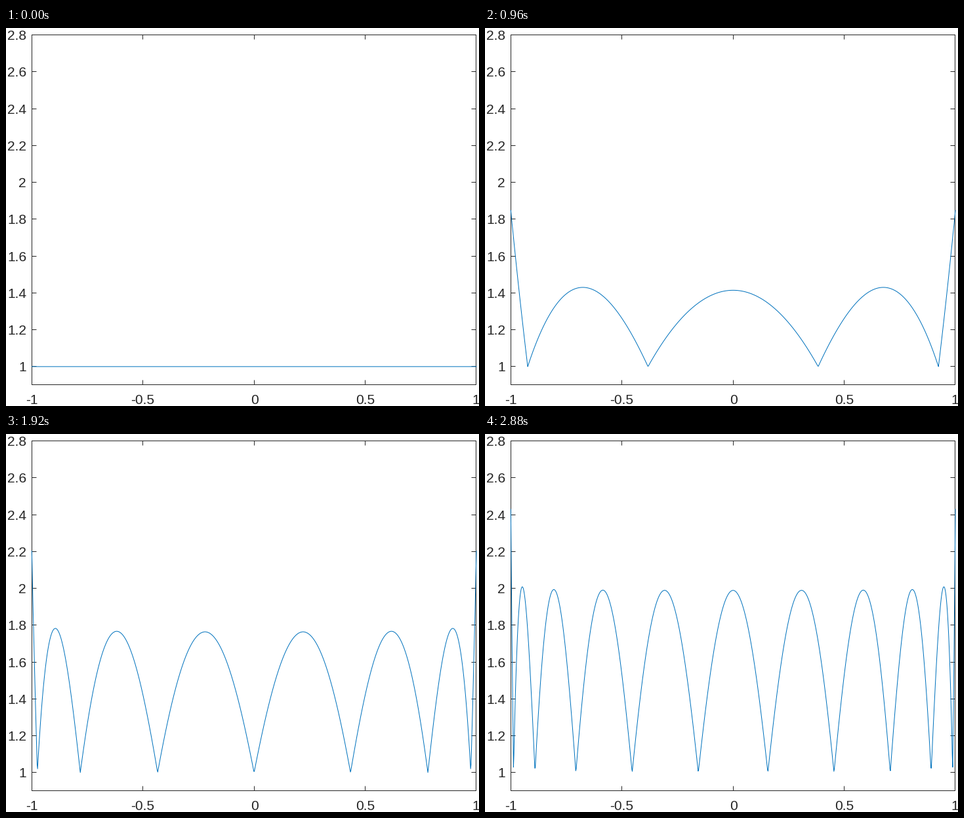
Animation, 721 px wide and 577 px high, one loop 3.2 s. Source, as a matplotlib script:

```python
import numpy as np
import matplotlib.pyplot as plt
from matplotlib.animation import FuncAnimation

# Lebesgue function of Chebyshev nodes, one more node per step.
WIDTH, HEIGHT, DPI = 721, 577, 64
PX = 72 / DPI
LEFT, RIGHT, TOP, BOTTOM = 39.3, 717.0, 10.5, 545.0
X_MIN, X_MAX, Y_MIN, Y_MAX = -1, 1, 0.9, 2.8
TICK = 7
INK, BLUE = "#262626", "#0072BD"
MAX_NODES, STEP_MS = 10, 320

plt.rcParams["font.family"] = "Liberation Sans"
plt.rcParams["path.simplify"] = False

fig = plt.figure(figsize=(WIDTH / DPI, HEIGHT / DPI), dpi=DPI, facecolor="white")
ax = fig.add_axes([0, 0, 1, 1])
ax.set_xlim(0, WIDTH)
ax.set_ylim(HEIGHT, 0)
ax.axis("off")


def to_px(x, y):
    return (LEFT + (x - X_MIN) / (X_MAX - X_MIN) * (RIGHT - LEFT),
            BOTTOM - (y - Y_MIN) / (Y_MAX - Y_MIN) * (BOTTOM - TOP))


def centre(value):
    return np.floor(value + 1e-6) + 0.5


def stroke(x0, y0, x1, y1):
    ax.plot([x0, x1], [y0, y1], color=INK, lw=PX, solid_capstyle="butt", snap=False)


def label(x, y, text, align):
    ax.text(x, y, text, color=INK, fontsize=21 * PX, ha=align, va="baseline")


def draw_frame():
    left, right = 39.5, 716.5
    top, bottom = 10.5, 544.5
    for y in (top, bottom):
        stroke(left - 0.5, y, right + 0.5, y)
    for x in (left, right):
        stroke(x, top, x, bottom)
    for value in np.linspace(-1, 1, 5):
        x = min(centre(to_px(value, 0)[0]), right)
        stroke(x, top, x, top + TICK)
        stroke(x, bottom, x, bottom - TICK)
        label(x, 574, f"{value:g}", "center")
    for value in np.linspace(1, 2.8, 10):
        y = centre(to_px(0, value)[1])
        stroke(left, y, left + TICK, y)
        stroke(right, y, right - TICK, y)
        label(31, y + 7.5, f"{value:.2g}", "right")


def lebesgue(x, count):
    nodes = np.cos((2 * np.arange(count) + 1) * np.pi / (2 * count))
    total = np.zeros_like(x)
    for i, node in enumerate(nodes):
        others = np.delete(nodes, i)
        total += np.abs(np.prod((x[:, None] - others) / (node - others), axis=1))
    return total


draw_frame()
samples = np.linspace(X_MIN, X_MAX, 1000)
curve, = ax.plot([], [], color=BLUE, lw=PX, solid_joinstyle="round",
                 snap=False, zorder=5)


def update(step):
    curve.set_data(*to_px(samples, lebesgue(samples, step + 1)))
    return curve,


anim = FuncAnimation(fig, update, frames=MAX_NODES, interval=STEP_MS,
                     repeat=True, repeat_delay=0)
plt.show()
```
